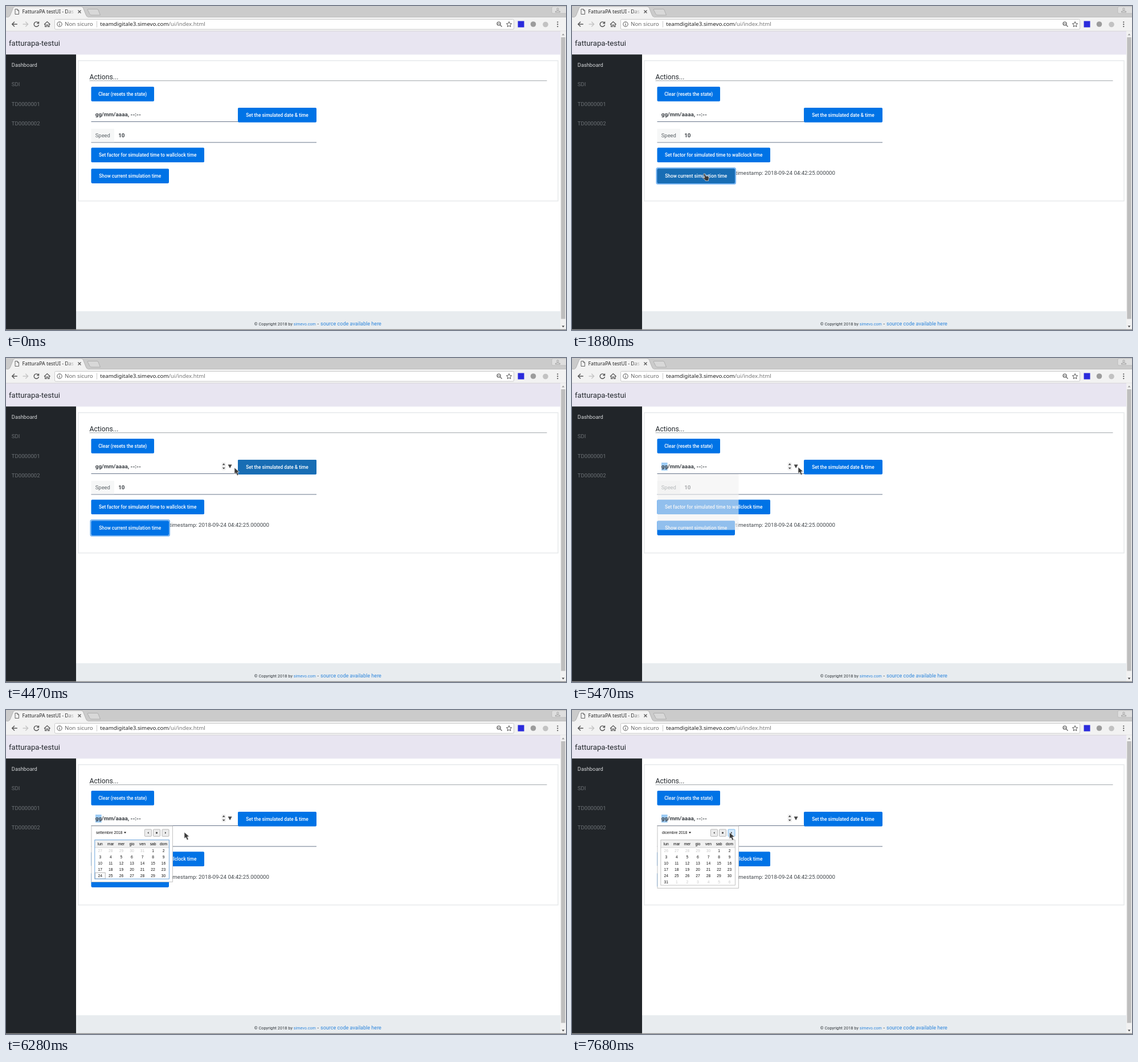
Recreate the animation shown at these times as an HTML page. Size 983x570 px, loop 8000 ms.

```html
<!DOCTYPE html>
<html lang="it">
<head>
<meta charset="utf-8">
<title>fatturapa-testui</title>
<style>
html, body { margin: 0; width: 100%; height: 100%; overflow: hidden; background: #fff; }
svg { display: block; width: 100%; height: 100%; }
text { font-family: Roboto, sans-serif; white-space: pre; }
.ui text { font-family: "Noto Sans", sans-serif; }
.icon { fill: none; stroke: #555; stroke-width: 1.4; }
.btn text { font-size: 8.3px; font-weight: 500; fill: #fff; text-anchor: middle; }
.strong { font-size: 9.9px; font-weight: 700; fill: #3c4146; }
.side { font-size: 9.6px; fill: #6d7276; }
.link { fill: #2f87dd; }
#popup text { font-family: "Liberation Sans", Arial, sans-serif; font-size: 6.7px; }
#popup .day { text-anchor: middle; }
</style>
</head>
<body>
<svg viewBox="0 0 983 570">
  <g class="ui">
    <rect width="983" height="20" fill="#cbcbcb"/>
    <rect y="19.5" width="983" height="24.5" fill="#f2f2f2"/>
    <path d="M0 19.5H983" stroke="#b4b4b4" stroke-width=".8"/>
    <path d="M3 20Q6 19.500 7.500 16L12.500 3.500Q13.500 1 16 1H132Q134.500 1 135.500 3.500L140.500 16Q142 19.500 145 20" fill="#f2f2f2" stroke="#a9a9a9" stroke-width=".8"/>
    <path d="M4 20.200H144.500" stroke="#f2f2f2" stroke-width="1.600"/>
    <path d="M144 5.500H160Q161.500 5.500 162 7L165.500 16H150Q148 16 147.200 14.500L143.300 7Q142.800 5.500 144 5.500Z" fill="#d8d8d8" stroke="#a6a6a6" stroke-width=".8"/>
    <path class="icon" d="M16 5.500H20L22.500 8V14.500H16ZM20 5.500V8H22.500" style="stroke-width:.9"/>
    <defs><linearGradient id="tabFade"><stop offset=".84" stop-color="#222"/><stop offset="1" stop-color="#222" stop-opacity=".15"/></linearGradient></defs>
    <text x="28.500" y="13.300" font-size="8.800" fill="url(#tabFade)">FatturaPA testUI - Das</text>
    <path class="icon" d="M126.500 7.500L131.500 12.500M131.500 7.500L126.500 12.500" style="stroke-width:1.200"/>
    <rect x="958" y="1" width="27" height="12" rx="2" fill="#dedede" stroke="#b5b5b5" stroke-width=".7"/>
    <g class="icon" style="stroke:#999;stroke-width:.9"><circle cx="968.500" cy="5.500" r="1.700"/><path d="M964.500 11V9.500Q968.500 6.800 972.500 9.500V11Z"/></g>
    <g class="icon">
      <path d="M19.800 32H11M15 27.700L10.700 32L15 36.300"/>
      <path d="M29.500 32H38.300M34.300 27.700L38.600 32L34.300 36.300" stroke="#c5c5c5"/>
      <path d="M56.700 29.500A4.200 4.200 0 1 0 57.500 33M57.500 27.500V30.500H54.300"/>
      <path d="M67 32.500L72.300 27.500L77.600 32.500M68.700 31.500V36.500H71V33.300H73.600V36.500H75.900V31.500" stroke-width="1.200"/>
    </g>
    <rect x="85.500" y="23.500" width="806" height="17.500" rx="2" fill="#fff" stroke="#c4c4c4" stroke-width=".9"/>
    <circle class="icon" cx="94" cy="32" r="4.200" style="stroke-width:1"/>
    <path d="M94 31.300V34.500M94 29.300V30.300" stroke="#555" stroke-width="1.100"/>
    <text x="103" y="35.400" font-size="9.800" fill="#686868">Non sicuro</text>
    <path d="M159.500 26.500V37.500" stroke="#bbb" stroke-width=".8"/>
    <text x="165.300" y="35.400" font-size="9.730" fill="#222">teamdigitale3.simevo.com<tspan fill="#777">/ui/index.html</tspan></text>
    <g class="icon" style="stroke-width:1.200"><circle cx="865" cy="31" r="3"/><path d="M867.300 33.300L870.500 36.500M863.500 31H866.500"/>
      <path d="M883 27.500L884.300 30.700L887.700 31L885.100 33.200L885.900 36.600L883 34.800L880.100 36.600L880.900 33.200L878.300 31L881.700 30.700Z" style="stroke-width:1"/></g>
    <rect x="898.500" y="26.500" width="11" height="11" fill="#2b2bdc"/>
    <circle cx="925.500" cy="32" r="4.800" fill="#9c9c9c"/>
    <circle cx="947" cy="32.500" r="4.800" fill="#c2c2c2"/>
    <g fill="#555"><circle cx="968.300" cy="28.300" r="1.100"/><circle cx="968.300" cy="32.200" r="1.100"/><circle cx="968.300" cy="36.100" r="1.100"/></g>
  </g>

  <rect y="44" width="973" height="41.500" fill="#e8e5f1"/>
  <path d="M0 44.200H983" stroke="#ccc" stroke-width=".7"/>
  <text x="5" y="70.300" font-size="13.150" fill="#23282d">fatturapa-testui</text>
  <rect y="85.300" width="123" height="485" fill="#212529"/>
  <text class="side" x="9.800" y="106.700" style="font-size:9.300px;fill:#d5d7d9">Dashboard</text>
  <text class="side" x="9.800" y="141.300">SDI</text>
  <text class="side" x="9.800" y="175.800">TD0000001</text>
  <text class="side" x="9.800" y="210.300">TD0000002</text>
  <rect x="973" y="44.500" width="10" height="525" fill="#f1f1f1"/>
  <rect x="974.300" y="55" width="7.400" height="495.500" fill="#bebebe"/>
  <path d="M975.700 51.500L978 48.500L980.300 51.500Z" fill="#999"/>
  <path d="M975.700 562.500H980.300L978 565.500Z" fill="#444"/>

  <rect x="126.700" y="96.200" width="842.300" height="246.800" fill="#fff" stroke="#e5e8ea" stroke-width="1.400"/>
  <text x="146.500" y="128.600" font-size="12.200" fill="#23282d">Actions...</text>
  <path d="M146.500 131.500H949.500" stroke="#a3a9ad"/>
  <path d="M149.500 203.500H407M149.500 240H545" stroke="#66748a"/>
  <rect id="selection" x="157" y="184" width="10.600" height="14" fill="#9ccbf5"/>
  <text class="strong" x="156.800" y="194.200">gg/mm/aaaa, --:--</text>
  <g id="spinner" fill="#444">
    <rect x="378.500" y="183.500" width="7.500" height="14" rx="2" fill="#efefef"/>
    <path d="M379.800 188.200L382.200 185.300L384.600 188.200ZM379.800 192.700H384.600L382.200 195.600ZM389.600 187.500H396.600L393.100 194Z"/>
  </g>
  <rect x="149.500" y="216" width="40.500" height="23.300" fill="#f6f7f7"/>
  <text x="156.800" y="231" font-size="9.400" fill="#5c6368">Speed</text>
  <text class="strong" x="197.200" y="231.300">10</text>
  <g id="stamp"><text x="286.800" y="297.300" font-size="9.700" fill="#40464b">timestamp: 2018-09-24 04:42:25.000000</text></g>
  <rect id="ring" x="148.500" y="285" width="138.500" height="28" rx="2.500" fill="none" stroke="#78b5f2" stroke-width="2.200"/>
  <g id="buttons"></g>

  <rect x="123" y="537" width="850" height="32" fill="#e8ecef"/>
  <text x="435.800" y="562" font-size="7.400" fill="#30363b">© Copyright 2018 by <tspan class="link" x="504.800" font-size="7.200">simevo.com</tspan></text>
  <text x="546.500" y="562" font-size="9.050" fill="#30363b">-<tspan class="link" x="552">source code available here</tspan></text>
  <rect y="568.700" width="983" height="1.300" fill="#8c8c8c"/>

  <g id="popup">
    <rect id="panel" x="150" y="204" width="142.500" height="98.500" fill="#fff" stroke="#bdbdbd" stroke-width=".9"/>
    <g id="content">
      <text id="title" x="158" y="218.400" fill="#111"></text>
      <path id="caret" d="M-2 -1.300H2L0 1.400Z" fill="#111"/>
      <g fill="#ececec" stroke="#b0b0b0" stroke-width=".9">
        <rect x="243.400" y="210" width="12" height="12.300" rx="1"/>
        <rect x="258.500" y="210" width="12" height="12.300" rx="1"/>
        <rect id="next" x="274" y="210" width="12" height="12.300" rx="1"/>
      </g>
      <path d="M250.500 214.300V218L248.300 216.100ZM279 214.300V218L281.200 216.100Z" fill="#444"/>
      <circle cx="264.500" cy="216.100" r="1.600" fill="#444"/>
      <rect x="156" y="229" width="130.300" height="13" fill="#f0f0f0"/>
      <path d="M156 242H286.300" stroke="#c9c9c9" stroke-width=".8"/>
      <g id="weekdays"></g>
      <clipPath id="gridClip"><rect id="gridWindow" x="155.500" y="242.400" width="131" height="54.500"/></clipPath>
      <g clip-path="url(#gridClip)"><g id="grid"><rect x="156.600" y="286.200" width="17.600" height="10.700" fill="none" stroke="#aaa" stroke-width=".9"/></g></g>
      <rect id="frame" x="155.800" y="228.600" width="130.600" height="68.600" fill="none" stroke-width=".9"/>
    </g>
  </g>

  <g id="cursor" fill="#3b3b3b" stroke="#e6e6e6" stroke-width=".7" stroke-linejoin="round">
    <path id="arrow" d="M0 0V11L2.700 8.900L4.900 13.700L7.200 12.600L5.100 8L8.500 7.600Z"/>
    <path id="hand" d="M0 .3Q1.100 -.8 2.200 .5L4.200 4.400L6.600 4.100L8.700 5Q9.600 6.500 9.300 8.500L8.500 10.300V12.500H3.200L2.700 10.800L-1.500 7.600Q-1.300 6.300 .2 6.700L2 7.500L-.1 1.700Z"/>
  </g>
</svg>
<script>
const LOOP = 8000;
const $ = id => document.getElementById(id);
const clamp = v => Math.max(0, Math.min(1, v));
const set = (el, attrs) => { for (const k in attrs) el.setAttribute(k, attrs[k]); };
const show = (id, on) => set($(id), { visibility: on ? 'visible' : 'hidden' });

function add(parent, tag, attrs, text = '') {
  const el = document.createElementNS('http://www.w3.org/2000/svg', tag);
  set(el, attrs);
  el.textContent = text;
  return parent.appendChild(el);
}

const buttons = [
  { label: 'Clear (resets the state)', x: 149.5, y: 142, w: 110.5 },
  { label: 'Set the simulated date & time', x: 407, y: 179, w: 138, hover: [4100, 4480] },
  { label: 'Set factor for simulated time to wallclock time', x: 149.5, y: 249.300, w: 198.5, hover: [3530, 3720] },
  { label: 'Show current simulation time', x: 149.5, y: 286.200, w: 136.5, hover: [1200, 3450] }
];
const H = 25.7;
for (const b of buttons) {
  const g = add($('buttons'), 'g', { class: 'btn' });
  const box = { x: b.x, y: b.y, width: b.w, height: H, rx: 1.8 };
  add(g, 'rect', { ...box, fill: '#0073e6' });
  b.shade = add(g, 'rect', { ...box, fill: '#186db4' });
  add(g, 'text', { x: b.x + b.w / 2, y: b.y + 15.6 }, b.label);
}

// Weeks from Monday 27 August 2018, one row each
const column = c => 165.3 + c * 18.55;
['lun', 'mar', 'mer', 'gio', 'ven', 'sab', 'dom'].forEach((d, c) =>
  add($('weekdays'), 'text', { class: 'day', x: column(c), y: 237.8 }, d));
const days = Array.from({ length: 19 * 7 }, (_, i) => {
  const date = new Date(Date.UTC(2018, 7, 27 + i));
  const el = add($('grid'), 'text',
    { class: 'day', x: column(i % 7), y: 249.9 + 11 * Math.floor(i / 7) }, date.getUTCDate());
  return { el, month: date.getUTCMonth() + (date.getUTCFullYear() - 2018) * 12 };
});

// Active months: [month, name, from, to, title width]
const months = [
  [8, 'settembre 2018', 0, 6930, 51],
  [9, 'ottobre 2018', 6930, 7090, 43.5],
  [10, 'novembre 2018', 7090, 7440, 51],
  [11, 'dicembre 2018', 7440, LOOP, 49]
];
const scrollSteps = [[0, 0], [6930, .3], [7010, 1.6], [7090, 3.1], [7180, 5.5], [7270, 8],
  [7350, 9], [7440, 9.7], [7530, 11.6], [7610, 12.9], [7680, 13]];
const path = [[1200, 231, 295], [3360, 231, 295], [4180, 425, 189], [4240, 425, 189], [4440, 401, 193],
  [4560, 401, 193], [4640, 398, 192.5], [4840, 398, 192.5], [4880, 397, 192], [6000, 397, 192],
  [6280, 313, 215], [6400, 292, 220.5], [6640, 275.5, 216.5], [7160, 275.5, 216.5], [7360, 276.5, 215.5]];

const held = (list, t) => list.filter(s => s[0] <= t).pop();

function cursorAt(t) {
  const q = Math.floor(t / 40) * 40;
  const i = path.findIndex(k => k[0] > q);
  if (i < 1) return (i ? path[path.length - 1] : path[0]).slice(1);
  const [a, b] = [path[i - 1], path[i]];
  const p = (q - a[0]) / (b[0] - a[0]);
  return [a[1] + (b[1] - a[1]) * p, a[2] + (b[2] - a[2]) * p];
}

function dayColor(month, t) {
  const m = months.find(x => x[0] === month);
  const fade = !m || t < m[2] ? 1 : clamp((t - m[3]) / 240) ** 2;
  const v = Math.round(17 + 183 * fade);
  return `rgb(${v},${v},${v})`;
}

function drawCalendar(t) {
  show('popup', t >= 5470);
  if (t < 5470) return;
  const blank = t < 5560;
  const [, name, , , width] = months.find(m => t < m[3]);
  const extra = t >= 7440 ? 11 : 0;
  set($('popup'), { opacity: blank ? .6 : t < 5650 ? .85 : 1 });
  set($('panel'), { height: 98.5 + extra, fill: blank ? '#f2f2f2' : '#fff', 'stroke-opacity': blank ? 0 : 1 });
  set($('content'), { opacity: blank ? 0 : 1 });
  set($('gridWindow'), { height: 54.5 + extra });
  set($('frame'), { height: 68.6 + extra, stroke: t < 6850 ? '#5b9bd8' : '#bdbdbd' });
  set($('next'), t < 6640 ? { fill: '#ececec', stroke: '#b0b0b0' } : { fill: '#d5e9fb', stroke: '#6fb0e8' });
  $('title').textContent = name;
  set($('caret'), { transform: `translate(${158 + width} 215.9)` });
  set($('grid'), { transform: `translate(0 ${-11 * held(scrollSteps, t)[1]})` });
  for (const d of days) set(d.el, { fill: dayColor(d.month, t) });
}

function draw(t) {
  for (const b of buttons) {
    const [from, to] = b.hover || [LOOP, LOOP];
    set(b.shade, { opacity: Math.min(clamp((t - from) / 260), 1 - clamp((t - to) / 190)) });
  }
  show('ring', t >= 1780 && t < 5240);
  show('stamp', t >= 1880);
  show('spinner', t >= 4440);
  show('selection', t >= 5240);
  drawCalendar(t);

  const [x, y] = cursorAt(t);
  const over = buttons.some(b => x >= b.x && x <= b.x + b.w && y >= b.y && y <= b.y + H);
  const visible = t >= 1220;
  set($('cursor'), { transform: `translate(${x} ${y})` });
  show('hand', visible && over);
  show('arrow', visible && !over);
}

const start = performance.now();
function tick() {
  draw((performance.now() - start) % LOOP);
  requestAnimationFrame(tick);
}
tick();
</script>
</body>
</html>
```
